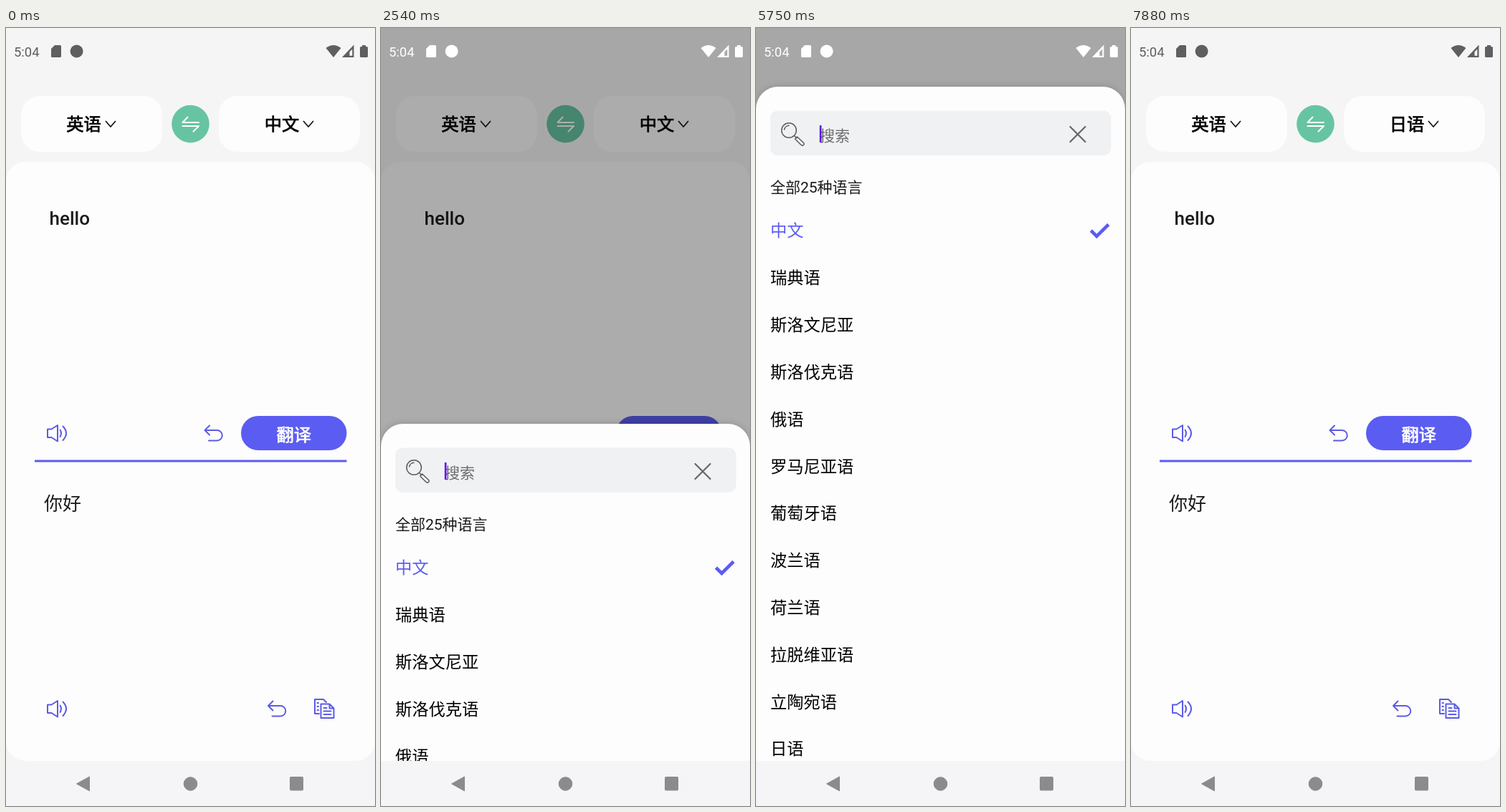
Animation, 515 px wide and 1087 px high, one loop 8 s. Source, as an HTML page:

```html
<!DOCTYPE html>
<html lang="zh-CN">
<head>
<meta charset="utf-8">
<title>Translator</title>
<style>
html, body { margin: 0; width: 100%; height: 100%; overflow: hidden; background: #f5f5f6; }
svg { display: block; width: 515px; height: 1087px; }
text { font-family: Roboto, "Noto Sans CJK SC", "Noto Sans CJK", sans-serif; white-space: pre; }
.line { fill: none; stroke-linecap: round; stroke-linejoin: round; }
.bold { stroke-width: .75; stroke-linejoin: round; }
#sheet { filter: drop-shadow(0 -1px 4px rgba(0, 0, 0, .14)); }
</style>
</head>
<body>
<svg viewBox="0 0 515 1087">
  <defs>
    <g id="speaker" class="line" stroke="#5b5be6" stroke-width="2">
      <path d="M58 560.5H63.5L72 555V577.5L63.5 572H58Z"/>
      <path d="M75.5 561.5Q78.500 566 75.500 571M79.500 556.500Q88.500 566 79.500 576"/>
    </g>
    <path id="undo" class="line" stroke="#5b5be6" stroke-width="2"
      d="M284 555.500L277.500 562L284 568.500M278 562H294.500A7.200 7.200 0 0 1 294.500 576.500H283"/>
    <path id="chevron" class="line" stroke="#111" stroke-width="1.700" d="M139.500 130.500L146 138L152.500 130.500"/>
  </defs>

  <rect width="515" height="1087" fill="#f5f5f6"/>
  <rect x="21" y="95" width="197" height="78" rx="26" fill="#fdfdfd"/>
  <rect x="297" y="95" width="197" height="78" rx="26" fill="#fdfdfd"/>
  <rect id="ripple" x="297" y="95" width="197" height="78" rx="26" fill="#dcdcda"/>
  <text class="bold" x="84.300" y="143" font-size="24.300" stroke="#000">英语</text>
  <text id="lang" class="bold" x="360.800" y="143" font-size="24.300" stroke="#000"></text>
  <use href="#chevron"/>
  <use href="#chevron" x="276"/>
  <circle cx="257.500" cy="134" r="26.300" fill="#67c4a2"/>
  <path class="line" stroke="#fff" stroke-width="2" d="M253.500 124.500L246.500 132H269M246.500 137H269L261.500 144.500"/>

  <rect y="187" width="515" height="837" rx="27" fill="#fdfdfd"/>
  <text x="60.500" y="275" font-size="26" font-weight="500" fill="#1c1c1e">hello</text>
  <use href="#speaker"/>
  <use href="#undo"/>
  <rect x="328" y="542" width="147.500" height="48" rx="24" fill="#5b5cf2"/>
  <text class="bold" x="377.500" y="577" font-size="24.300" fill="#fff" stroke="#fff">翻译</text>
  <rect x="40" y="603.500" width="435.500" height="3" fill="#5b5cf2"/>
  <text x="53" y="674" font-size="26" fill="#1c1c1e">你好</text>
  <use href="#speaker" y="385"/>
  <use href="#undo" x="88.500" y="385"/>
  <g class="line" stroke="#5b5be6" stroke-width="2">
    <path d="M437 958H431V938H443L447 942"/>
    <path d="M439.500 944.500H451.500L457.500 950.500V964H439.500ZM451.500 944.500V950.500H457.500"/>
    <path d="M443.500 950H447.500M443.500 954.500H453.500M443.500 959H453.500M434.500 943H436M434.500 948H436M434.500 953H436"/>
  </g>

  <rect id="dim" y="82" width="515" height="942"/>
  <rect id="dimTop" width="515" height="82"/>

  <g id="sheet">
    <path d="M0 1100V31A31 31 0 0 1 31 0H484A31 31 0 0 1 515 31V1100Z" fill="#fdfdfd"/>
    <rect x="20" y="33.500" width="475.500" height="62.500" rx="10" fill="#f0f1f3"/>
    <g class="line" stroke="#5c5c5c" stroke-width="1.500">
      <circle cx="46" cy="61" r="10.300"/>
      <path d="M39.500 60A6.800 6.800 0 0 1 46 54.300M53.500 68.500L56.500 71.500"/>
      <path d="M54.500 73L57.500 70L66.500 78.500Q68 81 65.500 82Q64 82.500 62.500 81Z"/>
    </g>
    <path class="line" stroke="#666" stroke-width="2.200" d="M438.500 56L459.500 77M459.500 56L438.500 77"/>
    <text id="hint" x="89" y="76" font-size="21" fill="#6c6c6e">搜索</text>
    <text id="typed" x="88.500" y="72" font-size="21" fill="#111">日</text>
    <rect id="cursor" width="2.600" height="24" fill="#6200ee"/>
    <text id="count" x="20" y="148.200" font-size="21" fill="#1a1a1a"></text>
    <rect id="press" y="168" width="515" height="65.800" fill="#000"/>
    <g id="full"></g>
    <text id="match" x="20" y="209.400" font-size="23.250">日语</text>
  </g>

  <g id="status">
    <text x="11" y="39.800" font-size="18.400">5:04</text>
    <path d="M68 24H75.500Q77 24 77 25.500V39.500Q77 41 75.500 41H64.500Q63 41 63 39.500V29Z"/>
    <circle cx="98.600" cy="32.500" r="9"/>
    <path d="M457 41L446.500 28Q457 20 467.500 28Z"/>
    <path d="M485.500 23.500V41H469ZM483.300 29.500L479.500 33.500V38.800H483.300Z" fill-rule="evenodd"/>
    <path d="M497 24H502V26H503.500Q505 26 505 27.500V39.500Q505 41 503.500 41H495.500Q494 41 494 39.500V27.500Q494 26 495.500 26H497Z"/>
  </g>

  <rect y="1024" width="515" height="63" fill="#f5f5f7"/>
  <g fill="#8b8b8f" stroke="#8b8b8f" stroke-linejoin="round">
    <path d="M98.500 1056L116.500 1046V1066Z"/>
    <circle cx="257.500" cy="1056" r="9.300"/>
    <rect x="396.500" y="1046.500" width="18" height="18.500" rx="1"/>
  </g>
</svg>
<script>
const LOOP = 8000, BOTTOM = 1024, HALF = 553, TOP = 82, SCRIM = .32;
const TYPE = 6100, PICK = 6800;
const names = ['中文', '瑞典语', '斯洛文尼亚', '斯洛伐克语', '俄语', '罗马尼亚语',
  '葡萄牙语', '波兰语', '荷兰语', '拉脱维亚语', '立陶宛语', '日语'];
const el = id => document.getElementById(id);
const show = (id, on) => el(id).setAttribute('visibility', on ? 'visible' : 'hidden');
const fade = (id, v) => el(id).setAttribute('opacity', v);
const ramp = (t, a, b) => Math.min(1, Math.max(0, (t - a) / (b - a)));
const out = u => 1 - (1 - u) ** 3;
const smooth = u => u * u * (3 - 2 * u);

el('full').innerHTML = names.map((s, i) =>
  `<text x="20" y="${209.4 + 65.82 * i}" font-size="23.25" fill="${i ? '#000' : '#5b5cf2'}">${s}</text>`
).join('') + '<path d="M467.5 201L475.500 209L492 192.500" fill="none" stroke="#5b5cf2" stroke-width="4.600"/>';

function sheetTop(t) {
  let y = BOTTOM - (BOTTOM - HALF) * out(ramp(t, 1185, 1420));
  y -= (HALF - TOP) * smooth(ramp(t, 2850, 3438));
  return y + (BOTTOM - TOP) * smooth(ramp(t, 6900, 7140));
}

function draw(t) {
  const y = sheetTop(t), typed = t >= TYPE;
  el('sheet').setAttribute('transform', `translate(0 ${y.toFixed(2)})`);
  show('sheet', y < BOTTOM - .5);

  const leave = 1 - ramp(t, 7000, 7200);
  fade('dim', SCRIM * ramp(t, 1280, 1450) * leave);
  fade('dimTop', SCRIM * ramp(t, 1190, 1270) * leave);
  el('status').setAttribute('fill', t > 1225 && t < 7100 ? '#fff' : '#5f5f61');
  fade('ripple', ramp(t, 1050, 1200) * (1 - ramp(t, 1320, 1500)));
  fade('press', .1 * ramp(t, PICK, PICK + 80) * (1 - ramp(t, 7000, 7140)));

  el('lang').textContent = t < PICK + 60 ? '中文' : '日语';
  el('count').textContent = typed ? '全部1种语言' : '全部25种语言';
  const open = y < BOTTOM - .5;
  show('hint', open && !typed);
  show('full', open && !typed);
  show('typed', open && typed);
  show('match', open && typed);

  const since = t - (typed ? TYPE : 1350);
  show('cursor', open && since >= 0 && since % 1000 < 500);
  el('cursor').setAttribute('x', typed ? 109.5 : 88.8);
  el('cursor').setAttribute('y', typed ? 52 : 54);
}

let start;
function tick(now) {
  start ??= now;
  draw((now - start) % LOOP);
  requestAnimationFrame(tick);
}
draw(0);
requestAnimationFrame(tick);
</script>
</body>
</html>
```
